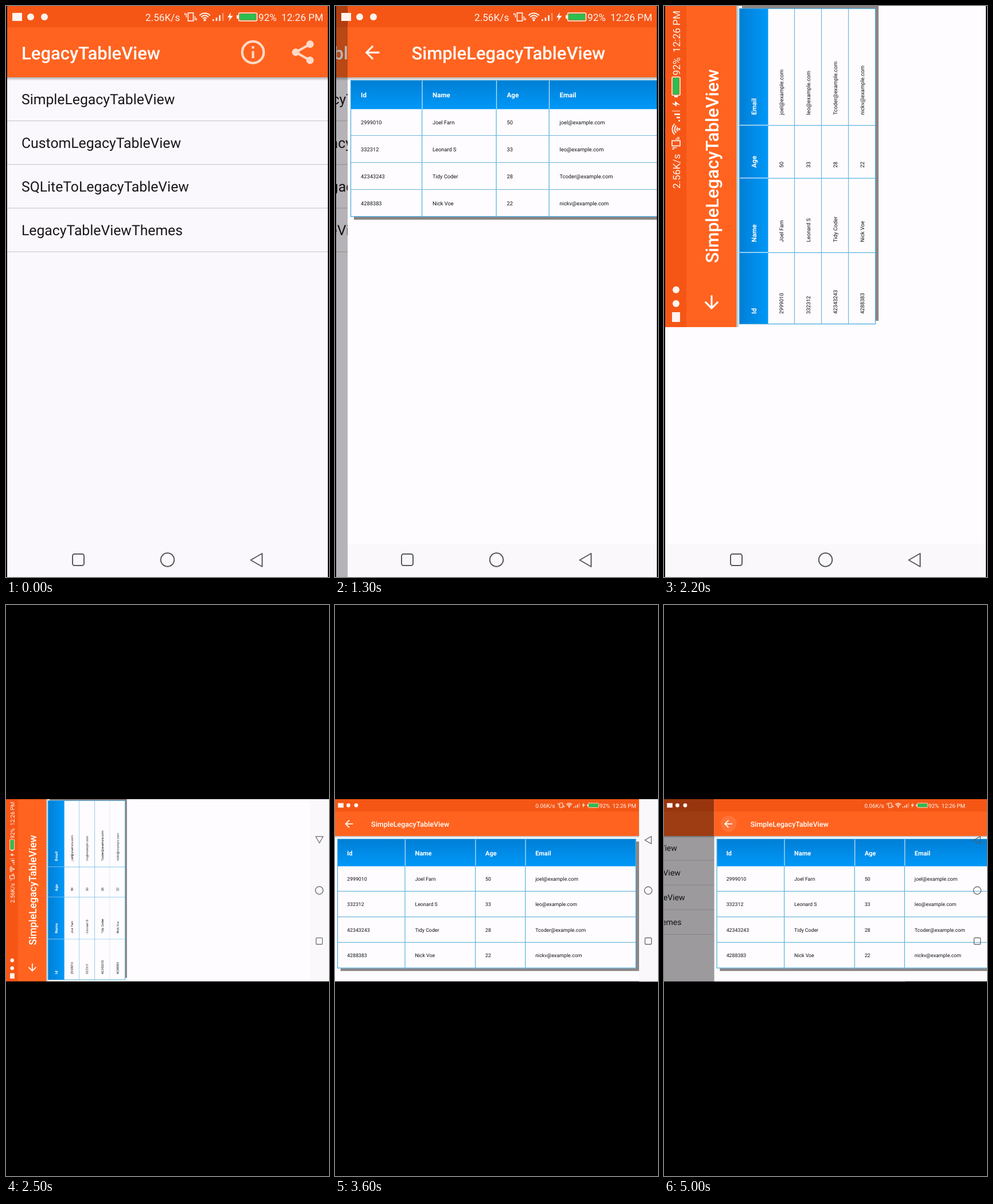
Animation of 563x994 px, one loop 5.1 s. Source, as an HTML page with a canvas:

```html
<!DOCTYPE html>
<html lang="en">
<head>
<meta charset="utf-8">
<title>Table view demo</title>
<style>
html, body { margin: 0; width: 100%; height: 100%; overflow: hidden; background: #000; }
canvas { display: block; }
</style>
</head>
<body>
<canvas id="stage" width="563" height="994"></canvas>
<script>
const LOOP = 5100, STEP = 100, SLIDE = 370;
const main = document.getElementById('stage').getContext('2d');
let c = main;

// The two screen layouts; k scales icons and margins.
const tall = { w: 559, h: 994, k: 1, status: 37, bar: 124, row: 76, title: 31, label: 24.75,
  speed: '2.56K/s', right: 551, left: -2, tableX: 5, tableY: 129, tableK: 1,
  band: [0, 936, 559, 58], nav: [[124, 964], [279.5, 964], [435, 964]], dim: q => .3 * q * q };
const wide = { w: 563, h: 317.5, k: .566, status: 21.5, bar: 64, row: 43, title: 12.5, label: 14,
  speed: '0.06K/s', right: 525, left: -1, tableX: 4, tableY: 69, tableK: .947,
  band: [530, 0, 33, 318], nav: [[546, 247], [546, 159], [546, 71]], dim: q => .45 * q };

const items = ['SimpleLegacyTableView', 'CustomLegacyTableView', 'SQLiteToLegacyTableView', 'LegacyTableViewThemes'];
const cols = [0, 125, 254.5, 346.5];
const rows = [
  ['Id', 'Name', 'Age', 'Email'],
  ['2999010', 'Joel Farn', '50', 'joel@example.com'],
  ['332312', 'Leonard S', '33', 'leo@example.com'],
  ['42343243', 'Tidy Coder', '28', 'Tcoder@example.com'],
  ['4288383', 'Nick Voe', '22', 'nickv@example.com']
];

function at(x, y, k, draw) {
  c.save();
  c.translate(x, y);
  c.scale(k, k);
  draw();
  c.restore();
}
function box(color, x, y, w, h) {
  c.fillStyle = color;
  c.fillRect(x, y, w, h);
}
function disc(x, y, r) {
  c.beginPath();
  c.arc(x, y, r, 0, 7);
  c.fill();
}
function line(color, width, ...pts) {
  c.strokeStyle = color;
  c.lineWidth = width;
  c.beginPath();
  for (let i = 0; i < pts.length; i += 2) c.lineTo(pts[i], pts[i + 1]);
  c.stroke();
}
// y is the middle of the capital letters.
function text(s, x, y, size, color, weight = 400) {
  c.font = `${weight} ${size}px Roboto, sans-serif`;
  c.textRendering = 'geometricPrecision';
  c.fillStyle = color;
  c.fillText(s, x, y + size * .356);
}
function fade(y, h, from, to) {
  const g = c.createLinearGradient(0, y, 0, y + h);
  g.addColorStop(0, from);
  g.addColorStop(1, to);
  return g;
}
function clip(x, y, w, h) {
  c.beginPath();
  c.rect(x, y, w, h);
  c.clip();
}

function header(g) {
  box(fade(g.bar, 6 * g.k, 'rgba(0,0,0,.3)', 'rgba(0,0,0,0)'), 0, g.bar, g.w, 6 * g.k);
  box('#ff631f', 0, 0, g.w, g.bar);
  box('#f55616', 0, 0, g.w, g.status);
}

function list(g) {
  box('#fbf8fd', 0, 0, g.w, g.h);
  header(g);
  const mid = (g.bar + g.status) / 2;
  text('LegacyTableView', 25 * g.k, mid + g.k, g.title, '#fff', 500);
  at(428 * g.k, mid, g.k, () => {
    const pale = c.strokeStyle = '#ffd9c8';
    c.lineWidth = 4.2;
    c.beginPath();
    c.arc(.5, 0, 18.8, 0, 7);
    c.stroke();
    box(pale, -1.6, -10.5, 4.2, 4.2);
    box(pale, -1.6, -2, 4.2, 12.5);
    line(pale, 4.2, 100, -14, 75, 0, 100, 14);
    disc(100, -14, 6.5);
    disc(75, 0, 6.5);
    disc(100, 14, 6.5);
  });
  items.forEach((s, i) => {
    const y = g.bar + g.row * i;
    text(s, 25 * g.k, y + g.row / 2, g.label, '#19171a');
    box('#d9d6da', 0, y + g.row - 1, g.w, Math.max(1, 1.6 * g.k));
  });
}

function table() {
  box('#8d8585', 6, 5, 550, 238);
  box('#fefcff', 0, 0, 550, 238);
  box(fade(1, 50, '#007fd6', '#0098f8'), 1, 1, 548, 49.5);
  cols.slice(1).forEach(x => {
    line('#c4e4f8', 1.3, x, 1, x, 50);
    line('#5bb5e0', 1.3, x - .4, 51, x - .4, 237);
  });
  [96.5, 143.5, 190.5].forEach(y => line('#6fb8dc', 1.2, 1, y, 549, y));
  c.strokeStyle = '#3fa6da';
  c.lineWidth = 1.2;
  c.strokeRect(.5, .5, 549, 237);
  rows.forEach((cells, r) => cells.forEach((s, i) => {
    if (r) text(s, cols[i] + 18, 26.6 + 46.9 * r, 9.3, '#111');
    else text(s, cols[i] + 18, 26, 11.6, '#fff', 700);
  }));
}

function page(g, loaded, pressed) {
  box('#fefcff', 0, 0, g.w, g.h);
  if (g === tall) box('#faf8fb', ...g.band);
  header(g);
  const mid = (g.bar + g.status) / 2;
  if (pressed) {
    c.fillStyle = 'rgba(255,255,255,.1)';
    disc(25, mid, 14);
  }
  at(43 * g.k, mid + .5 * g.k, g.k, () => {
    line('#fff', 3.1, 12.4, 0, -10, 0);
    line('#fff', 3.1, 1.1, -11.3, -10.2, 0, 1.1, 11.3);
  });
  text(items[0], 111.5 * g.k, mid + g.k, g.title, '#fff', 500);
  if (loaded) at(g.tableX, g.tableY, g.tableK, table);
}

function status(g) {
  const ink = '#fff3ee';
  at(g.left, 0, g.k, () => {
    box(ink, 11, 12, 17, 14);
    disc(43, 19, 6);
    disc(67, 19, 6);
  });
  // Right group, measured from the right edge of the clock.
  at(g.right, 0, g.k, () => {
    c.translate(-553, 0);
    text(g.speed, 243, 19.5, 17.2, ink);
    text('92%', 440, 19.5, 17.2, ink);
    text('12:26 PM', 480, 19.5, 17.2, ink);
    c.strokeStyle = ink;
    c.lineWidth = 1.7;
    c.strokeRect(317.5, 12, 9, 14);
    line(ink, 1.5, 314.5, 13, 314.5, 20);
    line(ink, 1.5, 312, 12, 312, 16);
    line(ink, 1.5, 329.5, 18, 329.5, 25);
    line(ink, 1.5, 332, 21, 332, 25);
    c.lineWidth = 2;
    [4.5, 8.5, 12.5].forEach(r => {
      c.beginPath();
      c.arc(346.5, 25, r, -2.4, -.74);
      c.stroke();
    });
    c.fillStyle = ink;
    disc(346.5, 24.5, 2);
    [3, 6, 10, 14].forEach((h, i) =>
      box(i < 3 ? ink : 'rgba(255,243,238,.4)', 360 + 5.6 * i, 26 - h, 2.6, h));
    c.fillStyle = ink;
    c.beginPath();
    [[392, 11], [386, 20], [390, 20], [388, 27], [395.5, 17], [391, 17]].forEach(p => c.lineTo(...p));
    c.fill();
    box(ink, 402, 16, 3, 6);
    box('#2dbe50', 407, 13.5, 29, 11);
    c.strokeStyle = ink;
    c.lineWidth = 1.5;
    c.beginPath();
    c.roundRect(405.5, 12, 32, 14, 2);
    c.stroke();
  });
}

function nav(g) {
  const [square, circle, back] = g.nav;
  const pen = () => {
    c.strokeStyle = '#58585b';
    c.lineWidth = 2;
    c.lineJoin = 'round';
    c.beginPath();
  };
  at(...square, g.k, () => {
    pen();
    c.roundRect(-10, -10, 20, 20, 3.5);
    c.stroke();
  });
  at(...circle, g.k, () => {
    pen();
    c.arc(0, 0, 11.7, 0, 7);
    c.stroke();
  });
  at(...back, g.k, () => {
    pen();
    c.moveTo(-10.5, .5);
    c.lineTo(9.5, -11);
    c.lineTo(9.5, 12);
    c.closePath();
    c.stroke();
  });
}

// away: 0 = table page covers the list, 1 = list only.
function screen(g, away, loaded = true, pressed = false) {
  c.save();
  clip(0, 0, g.w, g.h);
  if (away) {
    at(-.3 * g.w * (1 - away), 0, 1, () => list(g));
    box(`rgba(0,0,0,${g.dim(1 - away)})`, 0, 0, g.w, g.h);
  }
  if (away < 1) at(g.w * away, 0, 1, () => page(g, loaded, pressed));
  if (g === wide && !away) box('#faf8fb', ...g.band);
  status(g);
  nav(g);
  c.restore();
}

const part = (t, start, length) => Math.min(1, Math.max(0, (t - start) / length));
const easeOut = (q, n) => 1 - (1 - q) ** n;

// Upright picture of the tall screen, used while turning.
const shot = document.createElement('canvas');
shot.width = tall.w;
shot.height = tall.h;
c = shot.getContext('2d');
screen(tall, 0);
c = main;

// The tall page lying on its side for a moment, with the nav bar still upright.
function sideways() {
  box('#fefcff', 2, 0, tall.w, tall.h);
  c.save();
  c.translate(2, tall.w);
  c.rotate(-Math.PI / 2);
  clip(0, 0, tall.w, tall.w);
  page(tall, true);
  status(tall);
  c.restore();
  at(2, 0, 1, () => {
    box('#faf8fb', ...tall.band);
    nav(tall);
  });
}

// The tall picture turns, stretches and fades; the wide screen shows through within its outline.
function turning(p) {
  const mix = (a, b) => a + (b - a) * p;
  const w = mix(wide.h, wide.w), h = mix(wide.w, wide.h);
  c.save();
  clip(0, 338, wide.w, wide.h);
  c.translate(281.5, 496.75);
  c.rotate(-Math.PI / 2 * (1 - p));
  clip(-w / 2, -h / 2, w, h);
  if (p) at(-wide.w / 2, -wide.h / 2, 1, () => screen(wide, 0));
  c.globalAlpha = 1 - p;
  c.drawImage(shot, -w / 2, -h / 2, w, h);
  c.restore();
}

function draw(t) {
  box('#000', 0, 0, 563, 994);
  if (t < 2200) {
    const away = 1 - easeOut(part(t, 1000, SLIDE), 2);
    at(2, 0, 1, () => screen(tall, away, t >= 1200));
  } else if (t < 2300) {
    sideways();
  } else if (t < 3600) {
    turning(easeOut(part(t, 3165, 400), 5));
  } else {
    const away = easeOut(part(t, 4970, SLIDE), 2);
    at(0, 338, 1, () => screen(wide, away, true, t >= 4900));
  }
}

const start = performance.now();
function tick() {
  const t = (performance.now() - start) % LOOP;
  draw(Math.floor(t / STEP) * STEP);
  requestAnimationFrame(tick);
}
tick();
</script>
</body>
</html>
```
